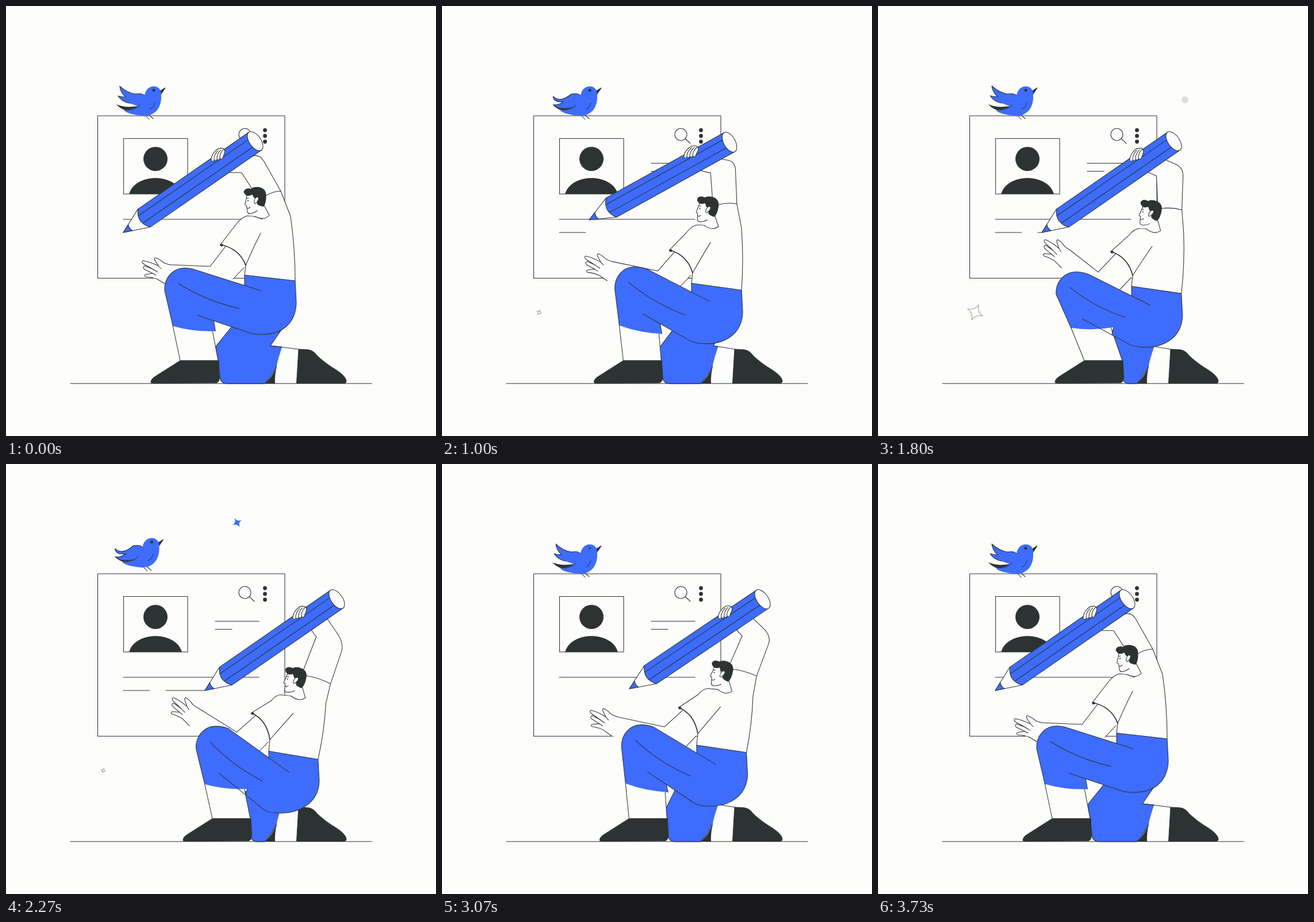
An HTML page with a canvas that plays this animation: 748x748 px, repeating every 3790 ms.

```html
<!DOCTYPE html>
<html lang="en">
<head>
<meta charset="utf-8">
<title>Filling in a profile</title>
<style>
  html, body { margin: 0; width: 100%; height: 100%; overflow: hidden; background: #fdfdfb; }
  canvas { display: block; width: 100vw; height: 100vh; }
</style>
</head>
<body>
<canvas id="stage"></canvas>
<script>
const SIZE = 748, LOOP = 3790;
const INK = '#2d3332', BLUE = '#3d6cff', PAPER = '#fdfdfb';

// Pencil position and lift, hip slide, torso lean (degrees), forward reach (0 to 1)
const POSES = [
  { at: 0, x: 204, lift: 0, slide: 0, lean: 0, reach: 0 },
  { at: 400, x: 248, lift: 0, slide: 13, lean: 4.5, reach: 0.19 },
  { at: 1000, x: 256, lift: 22, slide: 19, lean: 4, reach: 0.22 },
  { at: 1800, x: 285, lift: 0, slide: 26, lean: 6.3, reach: 1 },
  { at: 2270, x: 346, lift: 0, slide: 42, lean: 12, reach: 1 },
  { at: 3070, x: 326, lift: 3, slide: 28, lean: 11, reach: 0.4 }
];
POSES.push({ ...POSES[0], at: 3730 });

const canvas = document.getElementById('stage');
const ctx = canvas.getContext('2d');
const dpr = window.devicePixelRatio || 1;
canvas.width = canvas.height = SIZE * dpr;

// Geometry helpers
const off = (p, x, y) => [p[0] + x, p[1] + y];
const mix = (a, b, k) => a.map((v, i) => v + (b[i] - v) * k);
const mid = (a, b, x, y) => off(mix(a, b, 0.5), x, y);
const atX = (a, b, x) => mix(a, b, (x - a[0]) / (b[0] - a[0]));
const clamp = (v, a, b) => Math.min(b, Math.max(a, v));
function turn(p, from, to, deg) {
  const a = deg * Math.PI / 180, c = Math.cos(a), s = Math.sin(a);
  const x = p[0] - from[0], y = p[1] - from[1];
  return [to[0] + x * c - y * s, to[1] + x * s + y * c];
}
// Middle joint of a two-bone limb
function joint(a, b, la, lb) {
  const dx = b[0] - a[0], dy = b[1] - a[1], d = Math.hypot(dx, dy);
  const k = (la * la - lb * lb + d * d) / (2 * d);
  const h = Math.sqrt(Math.max(0, la * la - k * k));
  return off(a, (dx * k + dy * h) / d, (dy * k - dx * h) / d);
}
// Smooth pulse from 0 to 1 and back
function bump(t, center, reach) {
  const k = clamp((t - center) / reach, -1, 1);
  return Math.cos(k * Math.PI / 2) ** 2;
}

// Monotone cubic through one property of the poses
function curve(name) {
  const v = POSES.map(p => p[name]), at = POSES.map(p => p.at), last = v.length - 1;
  const d = v.slice(1).map((b, i) => (b - v[i]) / (at[i + 1] - at[i]));
  const m = v.map((_, i) => i === 0 || i === last || d[i - 1] * d[i] <= 0
    ? 0 : 2 * d[i - 1] * d[i] / (d[i - 1] + d[i]));
  return t => {
    if (t >= at[last]) return v[last];
    let i = 0;
    while (t >= at[i + 1]) i++;
    const h = at[i + 1] - at[i], k = (t - at[i]) / h, k2 = k * k, k3 = k2 * k;
    return v[i] * (2 * k3 - 3 * k2 + 1) + v[i + 1] * (3 * k2 - 2 * k3)
      + h * (m[i] * (k3 - 2 * k2 + k) + m[i + 1] * (k3 - k2));
  };
}
const [pencilX, lift, slide, lean, reach] = ['x', 'lift', 'slide', 'lean', 'reach'].map(curve);

// All joints follow from the five pose values
function solve(t) {
  const s = slide(t), a = lean(t), r = reach(t), up = lift(t);
  const waist = [415, 468], waistL = off(waist, s, s * 0.75);
  const torso = (x, y, k = 1) => turn([x, y], waist, waistL, a * k);
  const tip = [pencilX(t), 394 - up], tilt = -34.7 + up * 0.26;
  const grip = (x, y) => turn([x, y], [0, 0], tip, tilt);
  const step = 56 * r, nod = Math.min(12, s / 2);

  const wrist = grip(212, 20), cuffR = torso(478, 322, 1.6);
  const head = torso(433, 332), cuffL = off(head, 19, -2);
  const kneeX = 276 + s * 1.3, ankle = [303 + step, 617], shin = ankle[0] - kneeX;
  const knee = [kneeX, ankle[1] - Math.sqrt(131 ** 2 - shin ** 2)];
  const hemL = mix(knee, ankle, 0.53);

  return {
    s, a, step, tip, tilt, wrist, cuffR, cuffL, head, nod, ankle, knee, hemL, waistL,
    palm: [grip(206, 14), grip(214 + a * 1.8, 17)],
    armTop: grip(246, 14),
    elbow: joint(wrist, cuffR, 61, 74),
    inner: off(wrist, 20 - a, a * 0.9),
    innerEnd: off(cuffL, nod * 1.5 - 24, nod / 2 - 12),
    side: torso(495, 366),
    neck: torso(432, 365),
    shoulder: torso(405, 374),
    cuff1: off(torso(373, 415), 0, -a / 2),
    cuff2: off(torso(417, 451, 0), 0, -a / 4),
    foreElbow: off(torso(355, 453), 0, -a / 2),
    pit: torso(443, 395),
    waistR: [503 + s * 0.95, 478 + s * 0.85],
    hand: [237 + 52 * r, 446 - 37 * r],
    handTilt: 14 * r,
    thigh: [443 + s * 1.17, 495 + s * 0.98],
    hemR: off(hemL, 74, 21 - shin * 0.45),
    seat: [440 + s * 0.76, 571 + s * 0.86],
    under: [332 + s * 0.92, knee[1] + 49],
    backTop: [394 + s * 0.45, 556 + s * 0.32],
    backKnee: [365 + 62 * r, 592 + 40 * r * r],
    backEnd: [373 + 53 * r, 650]
  };
}

// Painting helpers
function draw(d, fill, stroke = INK, width = 1.05) {
  const p = new Path2D(d);
  if (fill) { ctx.fillStyle = fill; ctx.fill(p); }
  if (stroke) { ctx.strokeStyle = stroke; ctx.lineWidth = width; ctx.stroke(p); }
}
const line = d => draw(d, null);
const flat = (d, fill) => draw(d, fill, null);
function oval(x, y, rx, ry, fill, stroke) {
  ctx.beginPath();
  ctx.ellipse(x, y, rx, ry, 0, 0, Math.PI * 2);
  if (fill) { ctx.fillStyle = fill; ctx.fill(); }
  if (stroke) { ctx.strokeStyle = stroke; ctx.lineWidth = 1.05; ctx.stroke(); }
}
function group(from, to, deg, paint) {
  ctx.save();
  ctx.translate(to[0], to[1]);
  ctx.rotate(deg * Math.PI / 180);
  ctx.translate(-from[0], -from[1]);
  paint();
  ctx.restore();
}

function star(x, y, r, deg, waist, fill, stroke) {
  if (r < 0.3) return;
  const c = r * waist;
  group([0, 0], [x, y], deg, () => draw(
    `M0,${-r}Q${c},${-c} ${r},0Q${c},${c} 0,${r}Q${-c},${c} ${-r},0Q${-c},${-c} 0,${-r}Z`, fill, stroke));
}

function sparkles(t) {
  star(402, 102, 13 * (bump(t, 690, 320) + bump(t, 2420, 430) + bump(t, 3380, 350)), -30, 0.07, BLUE, null);
  ctx.globalAlpha = 0.45;
  star(169, 533, 16 * bump(t, 1620, 950) + 14 * bump(t, 2800, 250), 25, 0.16, null, INK);
  ctx.globalAlpha = 0.75 * (bump(t, 450, 330) + bump(t, 1570, 330));
  oval(534, 163, 6, 6, INK);
  ctx.globalAlpha = 1;
}

function card(t, x) {
  draw('M159.5,191H485V473.5H159.5Z', PAPER);
  draw('M204.5,230.5H316V327H204.5Z', PAPER);
  oval(260, 266, 21, 21, INK);
  flat('M214,327C225,290 295,290 306,327Z', INK);
  oval(415.5, 223.5, 10.5, 10.5, null, INK);
  line('M423.5,231L432,239');
  for (let i = 0; i < 3; i++) oval(450.5, 216 + 10 * i, 3.4, 3.4, INK);
  line('M364,273.5H440M364,287.5H393M204,371H440');

  ctx.globalAlpha = 1 - clamp((t - 2600) / 300, 0, 1);
  line(`M204,394H${t > 500 ? 249.5 : Math.min(x, 249.5)}`);
  if (t > 1700) line(`M278,394H${t > 2270 ? 346 : Math.max(278, x)}`);
  ctx.globalAlpha = 1;
}

function bird(t) {
  const hop = bump(t, 400, 400) + bump(t, 2270, 430);
  const wing = 1.35 * bump(t, 650, 700) + 0.85 * bump(t, 2440, 640);
  const w = Math.min(1, wing);
  group([0, 0], [-3.5 * hop, -11 * hop], 0, () => {
    const a = mix([198, 139], [191, 166], w), b = mix([195, 156], [195, 179], w);
    const notch = mix([208, 158], [213, 171], w), root = mix([215, 169], [228, 181], w);
    line('M242,190L249,197M248,189L256,196');
    draw('M268,148L277,142.5L270,153Z', INK);
    flat('M192,171Q208,178 229,174L222,186Q200,181 192,171Z', INK);
    flat('M241,156C243,136 269,134 270,153Q271,171 263,181Q255,191 240,191Q217,190 205,182Q222,180 229,174Z', BLUE);
    const feathers = `M241,156Q238,151 225,153Q${off(a, 13, 12)} ${a}Q${off(a, 1, 11)} ${notch}`
      + `Q${off(b, 6, 2)} ${b}Q${off(b, 6, 10)} ${root}`;
    flat(`${feathers}L229,174L250,172Z`, BLUE);
    line(feathers);
    line('M213,181Q226,180 233,172M259,168Q257,177 251,179');
    const blink = bump(t, 3070, 80);
    oval(257, 146.5, 2.5, 2.5 - 1.6 * blink, INK);
  });
}

function backLeg(p) {
  const c = [460 + Math.min(p.step, 12), 591];
  draw(`M${p.backTop}L${p.backKnee}L${p.backEnd}Q${off(p.backEnd, 2, 7)} ${off(p.backEnd, 14, 7)}`
    + `L450,657Q476,628 480,593L${c}L${off(c, 22, -32)}`, BLUE);
  flat('M480,593.5L509,597L505,657H467Q466,635 480,593.5Z', PAPER);
  flat('M450,657Q464,645 472,624Q467,640 468,657Z', INK);
  line(`M${c}L509,597`);
  draw('M509,597L526,598Q534,599 541,608Q550,617 566,628Q590,642 592,652Q592,656.5 586,656.5H505.5Z', INK);
  line('M112,656.8H636');
}

function raisedArm(p) {
  const bend = `L${mix(p.armTop, p.elbow, 0.6)}Q${p.elbow} ${mix(p.elbow, p.cuffR, 0.2)}L${p.cuffR}`;
  flat(`M${p.armTop}${bend}L${p.cuffL}L${p.innerEnd}L${p.inner}L${p.wrist}Z`, PAPER);
  line(`M${p.armTop}${bend}`);
  line(`M${p.wrist}L${p.inner}L${p.innerEnd}`);
  flat(`M${p.palm[0]}L${p.palm[1]}L${p.wrist}Z`, INK);
}

function shirt(p) {
  const { cuff1, cuff2, cuffL, cuffR, shoulder, neck, waistL, waistR, side } = p;
  const top = `L${off(shoulder, -5, 6)}Q${off(shoulder, 5, -7)} ${off(neck, -12, 0)}`
    + `Q${off(neck, 2, 0)} ${off(neck, 14, 6)}`;
  const flank = `L${side}Q${mid(side, waistR, 4, 0)} ${waistR}`;
  const sleeve = `Q${mid(cuffL, cuffR, 0, -4)} ${cuffR}`;
  const cuff = `Q${mid(cuff1, cuff2, 11, -11)} `;
  flat(`M${cuff1}${top}L${cuffL}${sleeve}${flank}L${waistL}L${cuff2}${cuff}${cuff1}Z`, PAPER);
  line(`M${cuff1}${top}`);
  line(`M${cuffL}${sleeve}${flank}`);
  line(`M${p.pit}Q${mid(p.pit, cuff2, -2, 2)} ${cuff2}L${waistL}`);
  draw(`M${cuff1}${cuff}${cuff2}`, null, INK, 1.7);
  oval(cuff1[0] + 2, cuff1[1] + 1, 2.6, 2.2, INK);
}

function restingArm(p) {
  const base = [237, 446], { cuff1, cuff2, foreElbow } = p;
  const top = turn([284, 450], base, p.hand, p.handTilt);
  const low = turn([278, 484], base, p.hand, p.handTilt);
  const end = off(cuff2, -22, 24), start = off(cuff1, 9, 3);
  flat(`M${top}L${foreElbow}L${start}Q${mid(cuff1, cuff2, 11, -11)} ${cuff2}L${end}L${low}Z`, PAPER);
  line(`M${top}L${foreElbow}L${start}M${off(cuff2, -3, 4)}L${end}`);
  group(base, p.hand, p.handTilt, () => {
    draw('M284,450L275,447Q264,438 259,438Q257,440 260,444L265,452Q248,444 238,443Q235,446 240,449'
      + 'L256,458L241,452Q237,455 241,458L255,465L243,467Q239,469 243,471Q255,472 263,475L278,484', PAPER);
    line('M265,452L270,457M256,458L264,463M255,465L261,468');
  });
}

function frontLeg(p) {
  const { s, knee, thigh, hemL, hemR, seat, under, waistL, waistR, ankle } = p;
  const cap = off(knee, 34, -33), top = off(cap, 22, 4);
  const hip = off(waistR, 2, 38), low = off(seat, -21, -4);
  const calf = atX(under, low, hemR[0] - 3);

  draw(`M${hemL}L${ankle}h66L${off(hemR, -5, 0)}`, PAPER);
  group([303, 617], ankle, 0, () =>
    draw('M303,617L262,643Q252,649 252,654Q252,656.5 258,656.5L366,655.5Q373,653 371,640L370,617Z', INK));

  const front = `M${hemL}L${off(knee, 0, 6)}C${off(knee, -1, -18)} ${off(cap, -18, 0)} ${cap}Q${off(cap, 11, 0)} ${top}`;
  const join = atX(top, thigh, waistL[0]);
  const rear = `L${hip}C${off(hip, -1, 38)} ${off(seat, 38, 2)} ${seat}Q${off(seat, -11, 0)} ${low}`;
  flat(`${front}L${join}L${waistL}L${waistR}${rear}L${calf}L${hemR}Q${mid(hemL, hemR, 0, 6)} ${hemL}Z`, BLUE);
  line(`${front}L${thigh}`);
  line(`M${join}L${waistL}L${waistR}${rear}L${under}`);
  line(`M${calf}L${hemR}`);
  const a = off(knee, 24, -6), b = off(thigh, -38 - s * 0.2, 31 - s * 0.38);
  line(`M${a}Q${mid(a, b, -6, 8)} ${b}`);
}

function face(p) {
  group([433, 332], p.head, p.nod, () => {
    flat('M419,329L416,344L420,358L426,361L436,357L434,366Q450,374 458,364L449,345Z', PAPER);
    line('M419,329Q418,338 416,344Q415,347 418.5,347L420,358Q421,362 426,361Q432,360 437,356');
    line('M449,347L458,364Q449,374 433,366');
    line('M419.5,351.5Q423,353 424.5,349.5M419,334.5L422,334');
    oval(421, 338.5, 0.9, 1.2, INK);
    flat('M419,330Q411,325 415,320Q419,316 426,318Q431,314 440,315Q452,317 452.5,329'
      + 'Q453,343 448,349Q441,348 437,345Q438,336 431,333Q430,330 428,328Q424,331 419,330Z', INK);
    draw('M432,343Q431,334 437,332Q441,333 438,339Q436,343 433,344', PAPER);
  });
}

function pencil(p) {
  group([0, 0], p.tip, p.tilt, () => {
    draw('M0,0L44,-19Q30,0 44,19Z', PAPER);
    draw('M0,0L15,-6.5Q12,0 15,6.5Z', BLUE);
    draw('M44,-19H279V19H44Q28,0 44,-19Z', BLUE);
    line('M38,-9H271M38,6H270');
    oval(279, 0, 10, 19, PAPER, INK);
    group([204, 394], [0, 0], 34.2, () => {
      flat('M364,254L374,249L382,253L376,264L364,264Z', PAPER);
      for (let i = 0; i < 4; i++) {
        group([0, 0], [i * 5, -i * 1.2], 0, () =>
          draw('M365,254Q358,261 358,269Q360,274 363,270L367,259', PAPER));
      }
      line('M365,254Q370,248 378,249Q382,250 382,255');
    });
  });
}

function frame() {
  const t = performance.now() % LOOP, p = solve(t);
  ctx.setTransform(dpr, 0, 0, dpr, 0, 0);
  ctx.lineJoin = ctx.lineCap = 'round';
  ctx.fillStyle = PAPER;
  ctx.fillRect(0, 0, SIZE, SIZE);

  sparkles(t);
  card(t, p.tip[0]);
  bird(t);
  backLeg(p);
  raisedArm(p);
  restingArm(p);
  shirt(p);
  frontLeg(p);
  face(p);
  pencil(p);
  requestAnimationFrame(frame);
}
frame();
</script>
</body>
</html>
```
